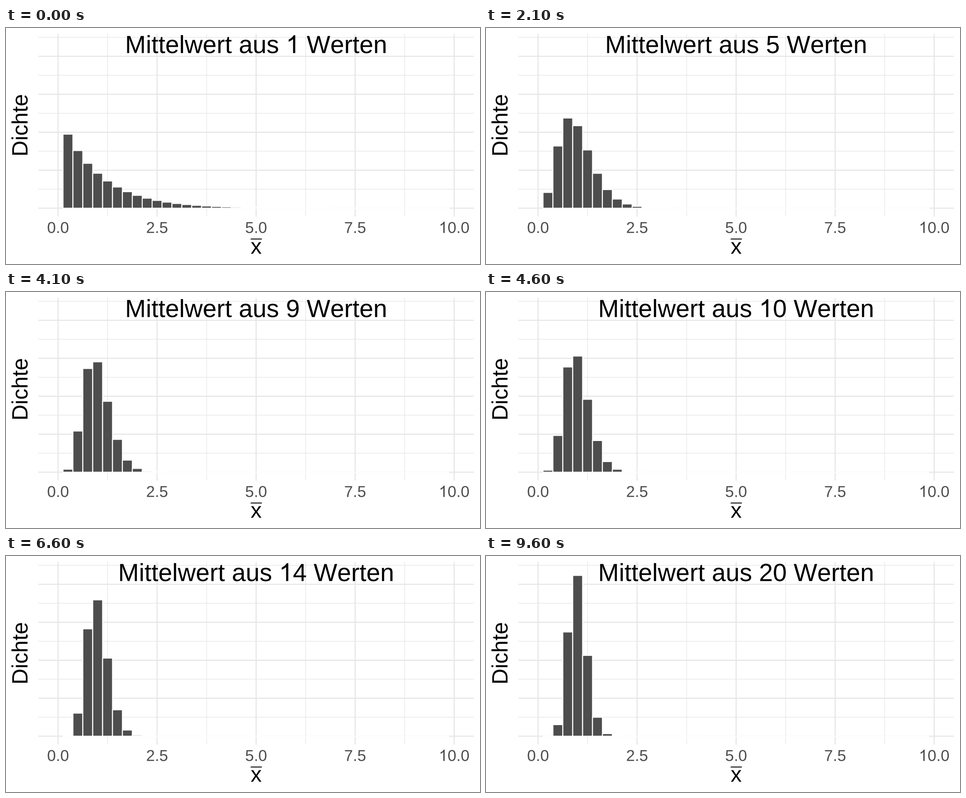
Write a matplotlib script that moves like this. It is 1058 px wide and 529 px high and loops after 10 s.

```python
import math

import matplotlib.pyplot as plt
from matplotlib.animation import FuncAnimation
from matplotlib.patches import PathPatch, Rectangle
from matplotlib.path import Path
from matplotlib.textpath import TextPath
from matplotlib.transforms import Affine2D

W, H, DPI = 1058, 529, 92
X0, UNIT = 116.2, 88.41          # pixel of x = 0, pixels per unit
BASE, MAJOR = 403.9, 85.1        # pixel of y = 0, pixels per major step
LEFT, RIGHT, TOP, BOTTOM = 72, 1044.5, 13.3, 422.5
BIN, BINS = 0.25, 39
TOTAL = 850                      # bar height in pixels for probability 1
DARK, GRID = "#4D4D4D", "#E6E6E6"
DIGIT, SPACE = 0.556, 0.278      # advances in em
TITLE, LABEL, TICK = 55.7, 49.4, 35.2

plt.rcParams["font.family"] = "Liberation Sans"
plt.rcParams["toolbar"] = "None"

fig = plt.figure(figsize=(W / DPI, H / DPI), dpi=DPI, facecolor="white")
ax = fig.add_axes([0, 0, 1, 1])
ax.set_xlim(0, W)
ax.set_ylim(0, H)
ax.axis("off")


def pt(px):
    return px * 72 / DPI


def line(x1, y1, x2, y2, width, color=GRID):
    ax.plot([x1, x2], [H - y1, H - y2], color=color, lw=pt(width),
            solid_capstyle="butt", snap=False)


def glyphs(x, y, text, size):
    return TextPath((x, H - y), text, size=size)


def one(x, y, size):
    """Plain numeral one without a foot."""
    stem, flag = (0.285, 0.373), (0.109, 0.455)   # left/right, x/bottom
    outline = [(stem[1], 0), (stem[0], 0), (stem[0], 0.56), (0.2, 0.5), flag,
               (flag[0], 0.54), (0.238, 0.623), (0.316, 0.719),
               (stem[1], 0.719), (stem[1], 0)]
    return Path([(x + a * size, H - y + b * size) for a, b in outline],
                closed=True)


def number(x, y, text, size):
    """Outline of a number whose digits are all equally wide."""
    parts = []
    for ch in text:
        parts.append(one(x, y, size) if ch == "1" else glyphs(x, y, ch, size))
        x += size * (SPACE if ch == "." else DIGIT)
    return Path.make_compound_path(*parts)


def ink(path, color="black"):
    return ax.add_patch(PathPatch(path, fc=color, lw=0, zorder=5))


def survival(n, x):
    """P(mean of n unit exponentials > x), the Erlang tail."""
    term = total = math.exp(-n * x)
    for k in range(1, n):
        term *= n * x / k
        total += term
    return total


def heights(n):
    tail = [survival(n, BIN * (i + 0.5)) for i in range(BINS + 1)]
    return [TOTAL * (a - b) for a, b in zip(tail, tail[1:])]


# Grid: minor lines first
for i in range(1, 10, 2):
    y = BASE - i * MAJOR / 2
    line(LEFT, y, RIGHT, y, 1.3)
for i in range(4):
    x = X0 + (i + 0.5) * 2.5 * UNIT
    line(x, TOP, x, BOTTOM, 1.3)
for i in range(5):
    y = BASE - i * MAJOR
    line(LEFT, y, RIGHT, y, 2.4)
    x = X0 + i * 2.5 * UNIT
    line(x, TOP, x, BOTTOM, 2.4)
    text = f"{2.5 * i:.1f}"
    width = TICK * ((len(text) - 1) * DIGIT + SPACE)
    ink(number(x - width / 2, 459.4, text, TICK), DARK)

bars = []
for i in range(BINS):
    bar = Rectangle((X0 + (i + 0.5) * BIN * UNIT, H - BASE), BIN * UNIT, 0,
                    fc=DARK, ec="white", lw=pt(2.2), snap=False, zorder=3)
    bars.append(ax.add_patch(bar))

# Axis titles
turn = Affine2D().rotate_deg(90).translate(48, H - 288.1)
ink(TextPath((0, 0), "Dichte", size=LABEL).transformed(turn))
ink(glyphs(546, 506, "x", LABEL))
line(546, 473, 571, 473, 2, "black")

title = ink(glyphs(0, 0, "x", 1))


def title_path(n):
    digits = str(n)
    before, after = 6.446, 3.501     # em on either side of the number
    x = 558.3 - TITLE * (before + DIGIT * len(digits) + after) / 2
    y = 56.2
    num = x + before * TITLE
    w = num + TITLE * (DIGIT * len(digits) + SPACE)
    return Path.make_compound_path(
        glyphs(x, y, "Mittelwert aus", TITLE),
        number(num, y, digits, TITLE),
        glyphs(w, y, "W", TITLE),
        glyphs(w + 0.944 * TITLE, y, "erten", TITLE))


def draw(frame):
    n = max(1, (frame - 1) // 5 + 1)
    title.set_path(title_path(n))
    for bar, h in zip(bars, heights(n)):
        bar.set_height(h)
    return [title, *bars]


anim = FuncAnimation(fig, draw, frames=100, interval=100, repeat=True,
                     repeat_delay=0, blit=False)
plt.show()
```
